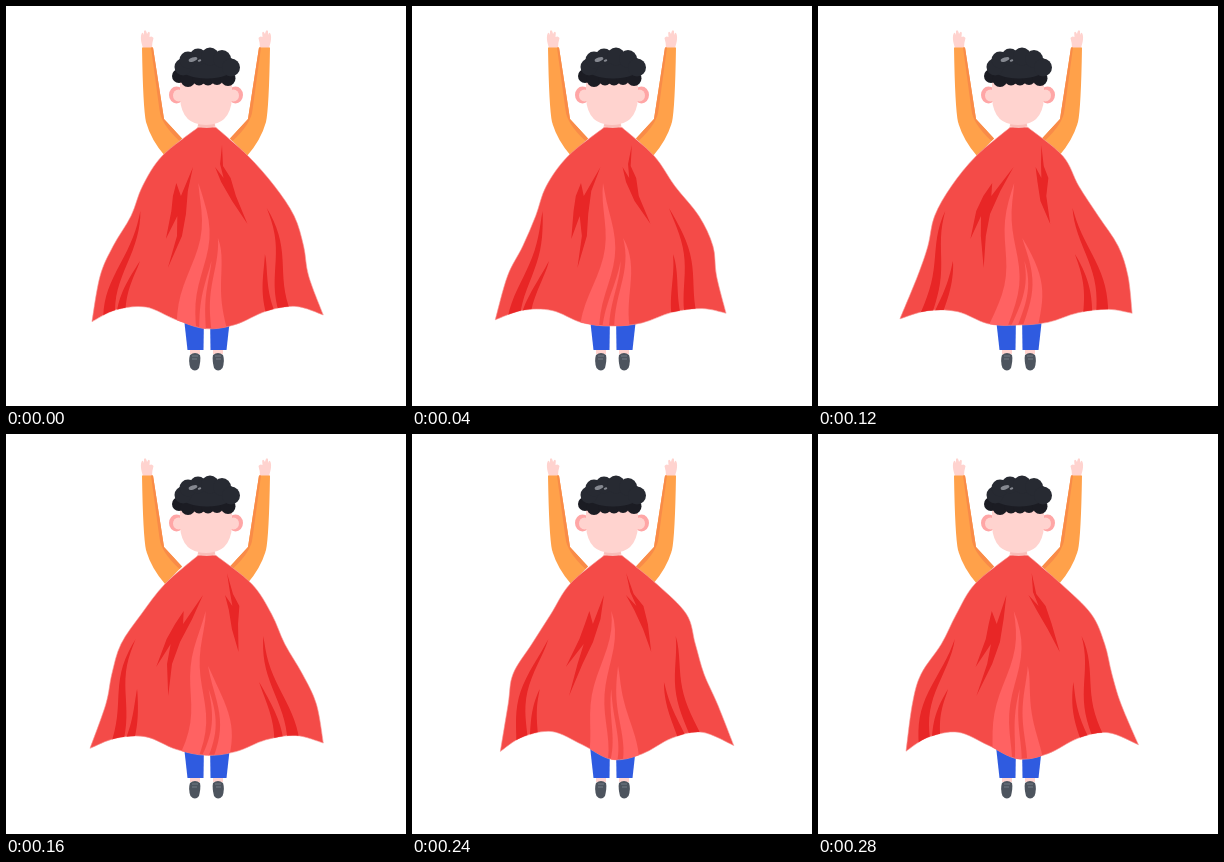
These frames come from a looping animation (400x400 px, 0.32 s). An HTML page:

```html
<!DOCTYPE html>
<html lang="en">
<head>
<meta charset="utf-8">
<title>Flying hero</title>
<style>
html, body { margin: 0; width: 100%; height: 100%; overflow: hidden; background: #fff; }
svg { display: block; width: 100vw; height: 100vh; }
</style>
</head>
<body>
<svg viewBox="0 0 400 400">
  <defs>
    <clipPath id="inside"><path id="clip"/></clipPath>
    <g id="arm">
      <path fill="#ffd3cf" d="M137 42C135 36 134 30 136 27Q137 26 138 29L138 25Q139.500 23 140.500 26L141 28Q143 24 143.800 27L143.500 31Q146 29.500 147.500 32Q146 37 146 42Z"/>
      <path fill="#ffa14a" d="M136 41.500H147L158 113L176 132.500L159 150Q145 134 140 116Q137 102 136 41.500Z"/>
      <path fill="#f98b48" d="M145 41.500H147L158 113L176 132.500L173.500 135Q155 118 153.500 104Z"/>
    </g>
    <g id="ear">
      <ellipse cx="170.500" cy="89" rx="7.500" ry="8.500" fill="#ffa6a6"/>
      <ellipse cx="172.500" cy="89.500" rx="5.500" ry="6" fill="#ffd3cf"/>
    </g>
    <path id="leg" fill="#2f5be0" d="M177.500 308H198L197.500 344H181.500Z"/>
    <g id="foot">
      <path fill="#ffd3cf" d="M184 344H194V348H184Z"/>
      <path fill="#4d545e" d="M184 349Q189 345 194 349Q195 354 193 362Q189 367 184.500 362Q182 355 184 349Z"/>
      <path fill="none" stroke="#7d848d" stroke-width=".8" d="M186 350H192M186 353H191"/>
    </g>
  </defs>
  <use href="#leg"/>
  <use href="#leg" transform="translate(402) scale(-1 1)"/>
  <use href="#foot"/>
  <use href="#foot" transform="translate(401) scale(-1 1)"/>
  <use href="#arm"/>
  <use href="#arm" transform="translate(400) scale(-1 1)"/>
  <path fill="#ffd3cf" d="M193 112H208L210 124H191Z"/>
  <path id="cloth" fill="#f44b48" stroke="#f79b98" stroke-width=".6"/>
  <g clip-path="url(#inside)">
    <path id="dark" fill="#e82626"/>
    <path id="light" fill="#ff6262"/>
  </g>
  <path fill="#f9bdb8" d="M193 116H208L209 120Q201 124 192 120Z"/>
  <use href="#ear"/>
  <use href="#ear" transform="translate(400) scale(-1 1)"/>
  <path fill="#ffd3cf" d="M174 72H226V93Q224 119 200 119Q176 119 174 93Z"/>
  <g fill="#1b1c23">
    <path d="M172 60H228V75H172Z"/>
    <circle cx="173" cy="70" r="7"/><circle cx="182" cy="73.500" r="7.500"/>
    <circle cx="193" cy="73" r="6.500"/><circle cx="202" cy="73" r="6.500"/>
    <circle cx="211" cy="72.500" r="6.500"/><circle cx="222" cy="72.500" r="7.500"/>
  </g>
  <g fill="#272a32">
    <ellipse cx="201" cy="59.500" rx="29" ry="13"/>
    <circle cx="177" cy="61" r="8.500"/><circle cx="182" cy="54" r="8.500"/>
    <circle cx="192" cy="51" r="8.500"/><circle cx="204" cy="50.500" r="9"/>
    <circle cx="216" cy="53" r="9"/><circle cx="225" cy="61.500" r="9"/>
  </g>
  <g fill="#858890">
    <ellipse cx="187" cy="53.500" rx="4.500" ry="2" transform="rotate(-18 187 53.500)"/>
    <ellipse cx="193.500" cy="54.500" rx="1.800" ry="1.100" transform="rotate(-18 193.500 54.500)"/>
  </g>
</svg>
<script>
const LOOP = 320, STEP = 40;
const FOLD_LEAD = 45, FOLD_SWAY = 5;

// Resting cape: edge points are [x, y, sway, bob], hem points [x, y, bob].
const leftEdge = [[192, 121.5, 0], [157.5, 150, 1.5], [136, 180, 3], [120, 210, 5], [106.5, 240, 5.5], [97, 270, 3], [85, 315, 3.5, 2.5]];
const rightEdge = [[210, 121.5, 0], [244, 150, 2], [267, 180, 7.5], [283.5, 210, 4.7], [297, 240, 5], [306.5, 270, 4], [317.3, 309, 4.5, 2.5]];
const hem = [[290, 301, 2.8], [260, 305.5, 1.5], [230, 318, -2], [200, 322, -3.5], [170, 314.5, 4], [140, 302, 4.5], [110, 304, 0.8]];

const darkBlades = [
  { from: [132, 205], to: [101, 310], width: 12, bow: -3 },
  { from: [132.5, 255], to: [114.5, 308], width: 9, bow: -1 },
  { from: [259, 202], to: [277, 306], width: 12, bow: 0 },
  { from: [256, 248], to: [264, 306], width: 9, bow: 0 }
];
const lightBlades = [
  { from: [196, 177], to: [171, 326], width: 20, bow: 3 },
  { from: [204, 255], to: [193.5, 326], width: 7, bow: 2 },
  { from: [207, 232], to: [206, 326], width: 16, bow: 3 }
];
const jags = [
  [[192, 161], [184, 185], [177, 208], [171, 230], [162, 262], [166, 230], [168, 210], [155, 233], [163, 205], [168, 190], [174, 177], [176, 190]],
  [[218.5, 139], [222, 160], [229, 172], [231, 190], [237, 218], [226, 195], [219, 176], [214, 161], [222, 172], [219, 158]]
];

const beat = (t, peak) => Math.cos((t - peak) / LOOP * 2 * Math.PI);
// A ripple that travels down the cloth.
const ripple = (y, t) => beat(t, 250 + 2.4 * (y - 180));
const swayFold = ([x, y], t) => [x + FOLD_SWAY * ripple(y, t + FOLD_LEAD), y];
const polygon = points => `M${points.map(p => p.map(v => v.toFixed(2))).join('L')}Z`;

// Smooth curve through the points, continuing from the first one.
function spline(points) {
  let d = '';
  for (let i = 0; i < points.length - 1; i++) {
    const a = points[i], b = points[i + 1], p = points[i - 1] || a, n = points[i + 2] || b;
    const c1 = a.map((v, j) => v + (b[j] - p[j]) / 6);
    const c2 = b.map((v, j) => v - (n[j] - a[j]) / 6);
    d += `C${[...c1, ...c2, ...b].map(v => v.toFixed(2))}`;
  }
  return d;
}

function capePath(t) {
  const move = ([x, y, sway, bob = 0]) => [x + sway * ripple(y, t), y + bob * ripple(y, t)];
  const left = leftEdge.map(move), right = rightEdge.map(move);
  const bottom = hem.map(([x, y, bob]) => [x, y + bob * beat(t, 90)]);
  const around = spline(right) + spline([right.at(-1), ...bottom, left.at(-1)]) + spline(left.reverse());
  return `M192 121.5Q201 120.5 210 121.5${around}Z`;
}

// A sliver that widens from its tip towards the hem.
function bladePath({ from, to, width, bow }, t) {
  const left = [], right = [];
  for (let s = 0; s <= 1; s += 1 / 16) {
    const x = from[0] + (to[0] - from[0]) * s + bow * 4 * s * (1 - s);
    const y = from[1] + (to[1] - from[1]) * s;
    left.push(swayFold([x, y], t));
    right.unshift(swayFold([x + width * s ** 0.8, y], t));
  }
  return polygon([...left, ...right]);
}

const jagPath = (points, t) => polygon(points.map(p => swayFold(p, t)));
const setPath = (id, d) => document.getElementById(id).setAttribute('d', d);

function draw(t) {
  const cape = capePath(t);
  setPath('cloth', cape);
  setPath('clip', cape);
  setPath('dark', [...darkBlades.map(b => bladePath(b, t)), ...jags.map(j => jagPath(j, t))].join(''));
  setPath('light', lightBlades.map(b => bladePath(b, t)).join(''));
}

const start = performance.now();
function tick() {
  const t = (performance.now() - start) % LOOP;
  draw(Math.floor(t / STEP) * STEP);
  requestAnimationFrame(tick);
}
tick();
</script>
</body>
</html>
```
